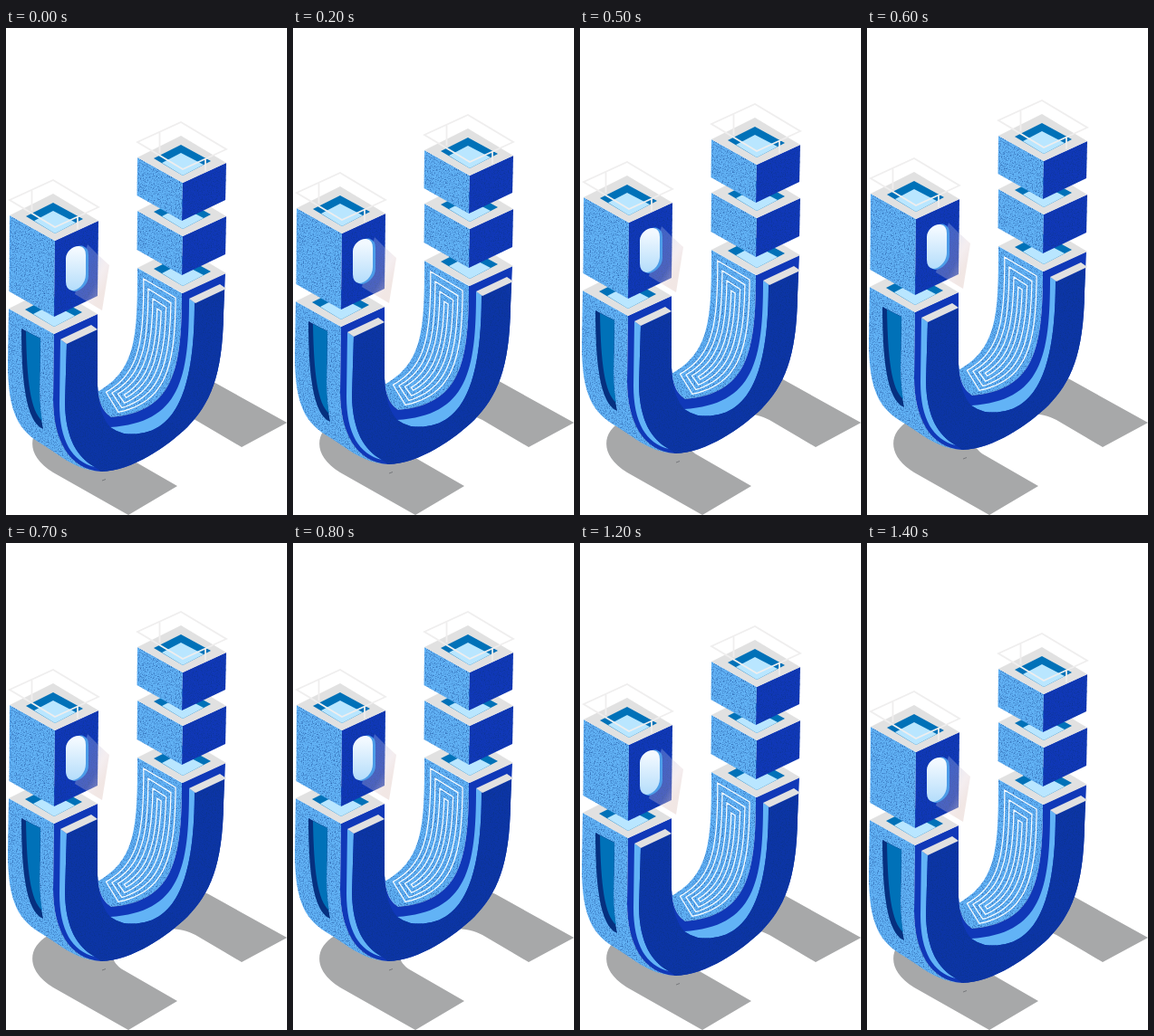
Recreate the animation shown at these times as an HTML page. Size 310 px wide and 538 px high, loop 1.45 s.

```html
<!DOCTYPE html>
<html lang="en">
<head>
<meta charset="utf-8">
<title>Floating letter U</title>
<style>
  html, body { margin: 0; width: 100%; height: 100%; overflow: hidden; background: #fff; }
  svg { display: block; width: 100vw; height: 100vh; }
  .sky { fill: #62b3f6; }
  .royal { fill: #1038b8; }
  .slab { fill: #0c35a6; }
  .rim { fill: #e1e1e1; }
  .deep { fill: #0071b8; }
  .pool { fill: #b9e6ff; }
  .navy { fill: #06307f; }
  .wire { fill: none; stroke: #efeeee; stroke-width: 1.8; }
  .lines { fill: none; stroke: #fff; stroke-width: 1.2; }
</style>
</head>
<body>
<svg viewBox="0 0 310 538" preserveAspectRatio="none">
  <defs>
    <filter id="grain" x="0" y="0" width="1" height="1" color-interpolation-filters="sRGB">
      <feTurbulence type="fractalNoise" baseFrequency=".8" numOctaves="2" seed="4"/>
      <feColorMatrix values="0 0 0 0 .04  0 0 0 0 .2  0 0 0 0 .5  1.6 0 0 0 -.75"/>
      <feComposite in2="SourceGraphic" operator="in" result="dots"/>
      <feMerge><feMergeNode in="SourceGraphic"/><feMergeNode in="dots"/></feMerge>
    </filter>
    <linearGradient id="glass" x1="0" y1="0" x2="0" y2="1">
      <stop offset=".1" stop-color="#f2f9ff"/><stop offset="1" stop-color="#b4ddfb"/>
    </linearGradient>
    <linearGradient id="beam" gradientUnits="userSpaceOnUse" x1="78" y1="262" x2="112" y2="282">
      <stop offset="0" stop-color="#9db4ee" stop-opacity=".35"/>
      <stop offset=".7" stop-color="#dcc6cc" stop-opacity=".3"/>
      <stop offset="1" stop-color="#e4cfca" stop-opacity=".5"/>
    </linearGradient>
  </defs>
  <path fill="#a7a8a9" d="M135 538L52 491C20 471 25 446 46 434L130 392C165 375 200 374 229 391L310 436L260 463L209 433C190 422 155 424 130 438C114 447 113 462 130 472L189 506Z"/>
  <g id="letter"></g>
</svg>
<script>
(() => {
  const letter = document.getElementById('letter');
  const shape = (cls, d, more = '') => `<path class="${cls}" d="${d}" ${more}/>`;
  const at = (x, y, body) => `<g transform="translate(${x} ${y})">${body}</g>`;
  const grain = body => `<g filter="url(#grain)">${body}</g>`;

  // Local origin of a box is the left corner of its lid.
  const lid = shape('rim', 'M0 0L48 -24L98 6L50 28Z')
    + shape('deep', 'M18 1L48 -14L81 4L50 20Z')
    + shape('pool', 'M27 6L48 -5L73 8L50 20Z');
  const box = h => grain(shape('sky', `M0 0L50 28L49 ${28 + h}L-.5 ${h}Z`)
    + shape('royal', `M50 28L98 6L97 ${5 + h}L49 ${28 + h}Z`)) + lid;
  const wire = shape('wire', 'M0 -17L48 -39L98 -9L50 13ZM24.5 -28V-5M75 2V15');

  // Inner curved surface, spanned between a back and a front edge.
  const back = [[145, 265], [145, 340], [144, 378], [101, 402]];
  const front = [[194, 293], [194, 380], [184, 424], [116, 430]];
  const bez = (p, t) => [0, 1].map(i => {
    const s = 1 - t;
    return s * s * s * p[0][i] + 3 * s * s * t * p[1][i] + 3 * s * t * t * p[2][i] + t * t * t * p[3][i];
  });
  const onSurface = (u, t) => {
    const a = bez(back, t), b = bez(front, t);
    return a.map((v, i) => (v + (b[i] - v) * u).toFixed(1)).join(' ');
  };
  function ring(inset, from, to) {
    const pts = [], n = 24;
    for (let i = 0; i <= n; i++) pts.push(onSurface(inset, from + (to - from) * i / n));
    for (let i = n; i >= 0; i--) pts.push(onSurface(1 - inset, from + (to - from) * i / n));
    return 'M' + pts.join('L') + 'Z';
  }
  const rings = [0, 1, 2, 3].map(i =>
    ring(.14 + i * .105, .036 + i * .036, .945 - i * .035)).join('');

  const bend = 'C102 415 107 424 116 430';
  const inside = `M145 265C145 340 144 378 101 402V395${bend}C184 424 194 380 194 293Z`;
  const outside = 'L240 315C239 385 225 415 200 441C178 462 140 489 105 490';

  const body =
    grain(shape('sky', inside)
      + shape('sky', 'M3 310L53 338L52 410C52 455 70 488 105 490C75 488 60 472 40 460C14 445 2 425 2 370Z'))
    + shape('lines', rings)
    + shape('navy', 'M17 332L38 343L37 400Q37 425 41 443C25 436 17 405 17 332Z')
    + shape('deep', 'M22 335L38 343L37 400Q37 420 40 434C27 423 23 390 22 335Z')
    + shape('royal', `M53 338L101 316V395${bend}C184 424 194 380 194 293L242 271${outside}C70 488 52 455 52 410Z`)
    + shape('sky', 'M60 344L67 349L65 415C66 453 78 474 98 485C73 479 59 456 59 415Z')
    + shape('sky', 'M202 299C202 388 192 436 115 441Q122 446 130 448C190 455 208 395 208 303Z')
    + grain(shape('slab', `M67 349L101 333V395C102 418 106 431 115 441Q122 446 130 448C190 455 208 395 208 303L241 288${outside}L98 485C78 474 66 453 65 415Z`))
    + ['0 0', '142 -45'].map(p =>
      shape('rim', 'M60 344L94 328L101 333L67 349Z', `transform="translate(${p})"`)).join('');

  const porthole =
    shape('', 'M90 239L102 251L114 262L106 312L76 294Z', 'fill="url(#beam)"')
    + shape('', 'M69 253C69 245 79 239 85 241Q91 243 91 251V274C91 284 81 291 75 291Q69 290 69 281Z', 'fill="#4c9ce8"')
    + shape('', 'M66 255C66 246 75 240 81 241Q88 242 88 251V272C88 283 79 290 73 290Q66 289 66 280Z', 'fill="url(#glass)"');

  letter.innerHTML =
    shape('', 'M106 500L110 498.5', 'stroke="#77797c"')
    + body + at(3, 310, lid) + at(145, 265, lid)
    + at(145, 202, box(43)) + at(145, 143, box(42) + wire)
    + at(4, 207, box(84) + wire) + porthole;

  // Rises and sinks two pixels per tick; the loop closes one tick early.
  const TICK = 50, TICKS = 29, PEAK = 15;
  const started = performance.now();
  function draw(now) {
    const k = Math.floor(Math.max(0, now - started) / TICK) % TICKS;
    const lift = 2 * (PEAK - Math.abs(k - PEAK));
    letter.setAttribute('transform', `translate(0 ${-lift})`);
    requestAnimationFrame(draw);
  }
  draw(started);
})();
</script>
</body>
</html>
```
